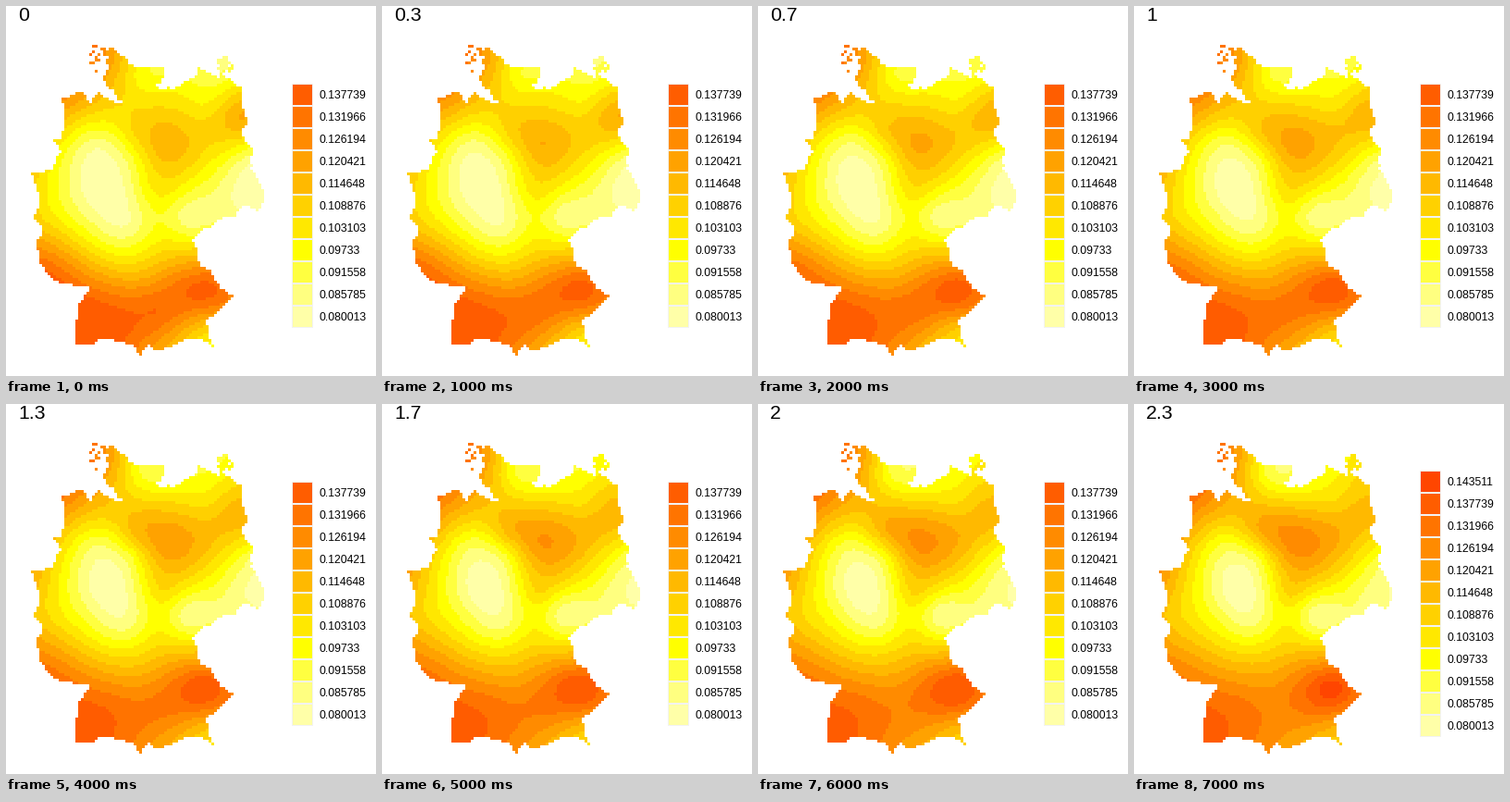
Write a matplotlib script that moves like this. It is 400 px wide and 400 px high and loops after 8 s.

```python
import numpy as np
import matplotlib.pyplot as plt
from matplotlib.animation import FuncAnimation
from matplotlib.colors import ListedColormap
from matplotlib.patches import Rectangle
from matplotlib.path import Path

SIZE, DPI, CELL = 400, 100, 3
FRAMES, INTERVAL = 8, 1000
LOW, STEP, LEVELS = 0.08001253, 0.00577263, 12
FONT = "Liberation Sans"
PX = 72 / DPI

# Border key points, longitude and latitude, clockwise from the north-west
NORTH_EAST = [
    (8.66, 55.0), (9.15, 55.0), (9.43, 54.83), (9.75, 54.78), (9.7, 54.56),
    (10.3, 54.52), (11.1, 54.52), (11.1, 54.25), (10.8, 54.05), (11.5, 54.0),
    (12.1, 54.2), (12.5, 54.5), (13.1, 54.3), (13.8, 54.2), (14.22, 53.95),
    (14.41, 53.2), (14.15, 52.86), (14.64, 52.5), (14.7, 51.8), (15.04, 51.25),
    (14.85, 50.87), (14.32, 51.03), (13.9, 50.78), (12.5, 50.38),
    (12.2, 50.2), (12.5, 49.93), (12.4, 49.7), (13.03, 49.27),
    (13.84, 48.77), (13.45, 48.53), (12.8, 48.15),
]
SOUTH_WEST = [
    (13.05, 47.5), (12.7, 47.65), (11.6, 47.57), (11.1, 47.4), (10.45, 47.52),
    (10.2, 47.25), (9.95, 47.5), (9.1, 47.66), (8.5, 47.7), (8.4, 47.56),
    (7.55, 47.52), (7.58, 48.1), (8.22, 48.97), (6.75, 49.16), (6.4, 49.45),
    (6.13, 50.05), (6.3, 50.35), (6.0, 50.75), (6.15, 51.4), (5.93, 51.85),
    (6.8, 51.95), (7.05, 52.4), (6.72, 52.68), (7.1, 52.75), (7.05, 53.75),
    (8.05, 53.85), (8.2, 53.55), (8.5, 53.9), (9.5, 53.66), (8.9, 54.02),
    (8.7, 54.3), (8.95, 54.5),
]
# Speckled islands: x, y, half width, half height, density
ISLANDS = [(97, 57, 6, 15, 0.4), (236, 66, 9, 12, 0.75)]

# x, y and the level at the start and at the end
KEY_LEVELS = [
    # western hollow
    (100, 183, -0.5, 0.3), (116, 205, -0.4, -0.4), (132, 236, 0.5, 1.3),
    (150, 200, 2.8, 3), (135, 165, 2.2, 2.6), (100, 150, 0.8, 2.4),
    (74, 185, 1, 2.6), (92, 225, 1, 1.9),
    # eastern hollows and the ridge beside them
    (168, 205, 3.6, 4.8), (166, 245, 3, 3.8), (197, 228, 0.8, 0.6),
    (225, 205, 1.3, 2.4), (258, 203, -0.1, 1), (266, 168, 0.6, 2),
    # north
    (112, 60, 7, 7), (148, 74, 2.8, 1.8), (75, 105, 6.6, 8),
    (190, 85, 3, 2.7), (232, 72, 1.5, 3.9), (215, 108, 3.6, 4.7),
    (255, 120, 6.6, 6), (172, 152, 6.2, 8.1), (215, 143, 4.9, 6.9),
    (138, 138, 4.5, 6.7),
    # west and south
    (35, 190, 4.4, 6.7), (33, 230, 5, 5.6), (52, 275, 8.2, 7.3),
    (130, 275, 4, 5), (150, 297, 6.8, 7), (112, 324, 9.6, 8.9),
    (163, 330, 9.5, 8.3), (214, 306, 10, 11.1), (205, 285, 7.8, 8.3),
    (240, 318, 8.4, 8.7), (215, 350, 4.9, 6.4), (160, 366, 7.5, 7.3),
]


def project(points):
    lon, lat = np.array(points).T
    return np.column_stack([26.5 + (lon - 5.87) * 27.5,
                            43 + (55.06 - lat) * 43])


def roughen(points, rng, rounds=3):
    """Break each border segment with small sideways shifts."""
    for _ in range(rounds):
        step = np.roll(points, -1, axis=0) - points
        side = np.column_stack([-step[:, 1], step[:, 0]])
        shift = rng.uniform(-0.15, 0.15, (len(points), 1))
        mid = points + step / 2 + side * shift
        points = np.stack([points, mid], axis=1).reshape(-1, 2)
    return points


def thin_plate(a, b):
    r2 = ((a[:, None] - b[None]) ** 2).sum(-1)
    return r2 * np.log(r2 + 1e-9)


def spline(nodes, values, targets):
    """Thin-plate surface through the nodes, read at the targets."""
    def affine(p):
        return np.column_stack([np.ones(len(p)), p])

    base = affine(nodes)
    system = np.block([[thin_plate(nodes, nodes), base],
                       [base.T, np.zeros((3, 3))]])
    rhs = np.vstack([values, np.zeros((3, values.shape[1]))])
    weights = np.linalg.solve(system, rhs)
    return np.hstack([thin_plate(targets, nodes), affine(targets)]) @ weights


# Grid cells and the land mask
xs = np.arange(27, 282, CELL)
ys = np.arange(42, 381, CELL)
gx, gy = np.meshgrid(xs + CELL / 2, ys + CELL / 2)
cells = np.column_stack([gx.ravel(), gy.ravel()])
rng = np.random.default_rng(4)
border = roughen(project(NORTH_EAST + SOUTH_WEST), rng)
land = Path(border).contains_points(cells).reshape(gx.shape)
for x, y, rx, ry, density in ISLANDS:
    inside = np.hypot((gx - x) / rx, (gy - y) / ry) < 1
    land |= inside & (rng.random(gx.shape) < density)

keys = np.array(KEY_LEVELS)
start, end = spline(keys[:, :2] / 100, keys[:, 2:], cells / 100).T


def levels_at(share, top):
    field = start + (end - start) * share
    level = np.clip(np.rint(field), 0, top).reshape(gx.shape)
    return np.ma.masked_array(level, ~land)


colors = [(1, 1, blue) for blue in (0.66, 0.5, 0.25)]
colors += [(1, green / 11, 0) for green in range(11, 2, -1)]

fig = plt.figure(figsize=(SIZE / DPI, SIZE / DPI), dpi=DPI, facecolor="white")
ax = fig.add_axes([0, 0, 1, 1])
area = ax.imshow(levels_at(0, LEVELS - 2), cmap=ListedColormap(colors),
                 vmin=-0.5, vmax=LEVELS - 0.5, interpolation="nearest",
                 extent=(xs[0], xs[-1] + CELL, ys[-1] + CELL, ys[0]))
ax.set(xlim=(0, SIZE), ylim=(SIZE, 0), aspect="auto")
ax.axis("off")
title = ax.text(13.3, 15.6, "", family=FONT, size=21.3 * PX)
legend = []
for k, color in enumerate(colors):
    box = ax.add_patch(Rectangle((308.5, 0), 22, 23, fc=color,
                                 ec="#f2f2f2", lw=PX))
    value = f"{LOW + k * STEP:.6f}".rstrip("0")
    label = ax.text(338.8, 0, value, family=FONT, size=12.2 * PX)
    legend.append((box, label))


def draw(i):
    last = i == FRAMES - 1
    top = LEVELS - 1 if last else LEVELS - 2
    area.set_data(levels_at(i / (FRAMES - 1), top))
    title.set_text(f"{round(i / 3, 1):g}")
    for k, (box, label) in enumerate(legend):
        y = 335.5 + 12 * last - 24 * k
        box.set_y(y - 11.5)
        label.set_y(y + 4.4)
        box.set_visible(k <= top)
        label.set_visible(k <= top)
    return [area, title]


anim = FuncAnimation(fig, draw, frames=FRAMES, interval=INTERVAL,
                     repeat=True, repeat_delay=0, blit=False)
plt.show()
```
